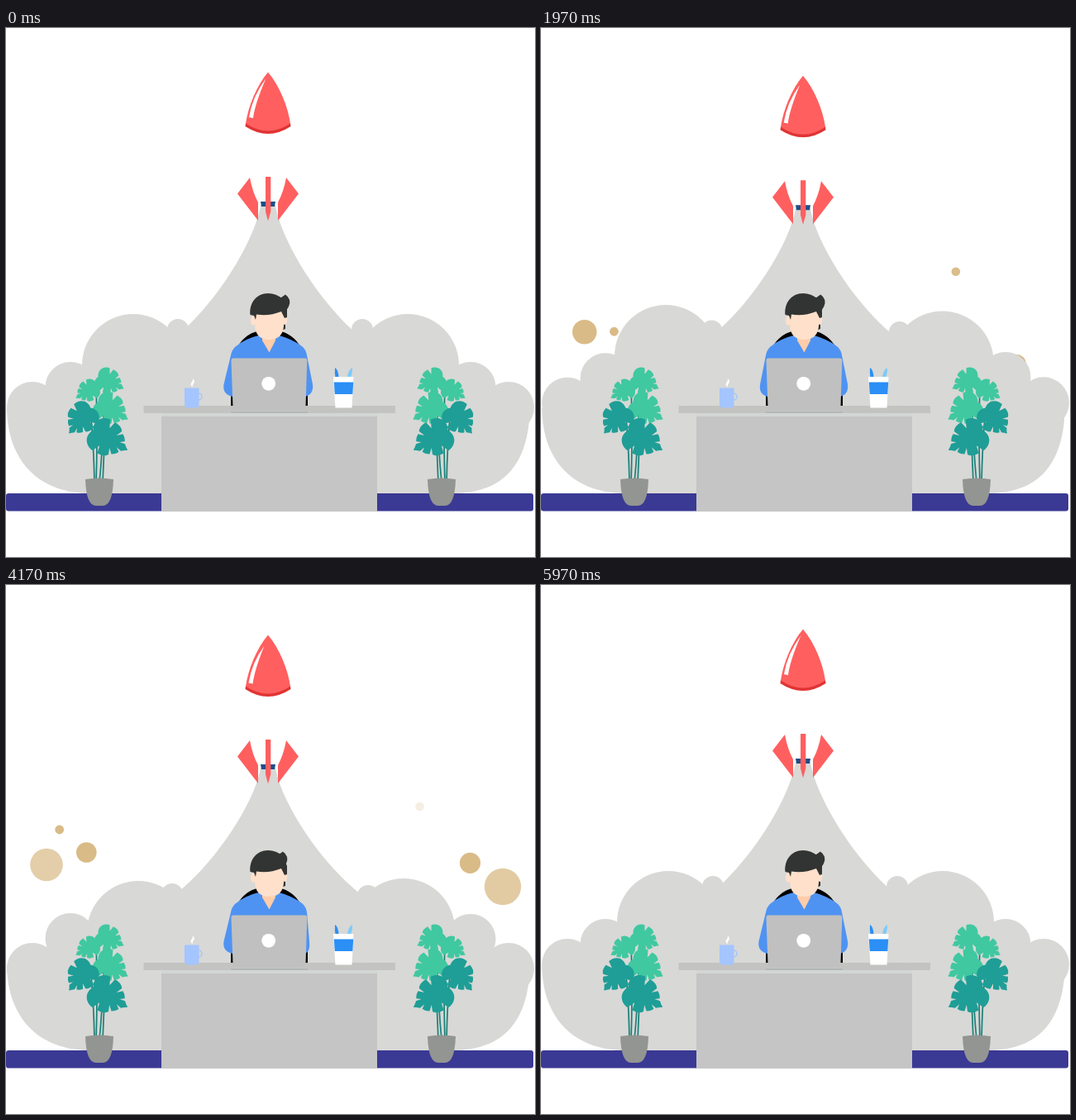
An HTML page that plays this animation: 640 px wide and 640 px high, repeating every 6.01 s.

```html
<!DOCTYPE html>
<html lang="en">
<head>
<meta charset="utf-8">
<title>Desk launch</title>
<style>
html, body { margin: 0; width: 100%; height: 100%; overflow: hidden; background: #fff; }
svg { display: block; width: 100vw; height: 100vh; }
</style>
</head>
<body>
<svg viewBox="0 0 640 640">
  <defs>
    <path id="half" d="M0 2C-16-20-2-46 24-48L34-27 39-48Q60-48 67-36L60-19 73-31Q84-25 87-16L76-8 91-11 104 0V2Z"/>
    <g id="leaf"><use href="#half"/><use href="#half" transform="scale(1 -1)"/></g>
    <g id="plant">
      <g fill="none" stroke="#1a8078" stroke-width="1.7">
        <path d="M100 432Q106 425 109 433Q111 490 109 550"/>
        <path d="M102 462Q106 500 107 550"/>
        <path d="M119 428Q118 500 113 550"/>
        <path d="M121 458Q119 500 117 550"/>
      </g>
      <g fill="#40c8a0">
        <use href="#leaf" transform="translate(109 433.5) rotate(150) scale(.27)"/>
        <use href="#leaf" transform="translate(112 422) rotate(25) scale(.32)"/>
        <use href="#leaf" transform="translate(112 453) rotate(30) scale(.39)"/>
      </g>
      <g fill="#1e9e96">
        <use href="#leaf" transform="translate(102 460) rotate(130) scale(.38)"/>
        <use href="#leaf" transform="translate(106 487) rotate(30) scale(.45)"/>
      </g>
      <path fill="#929591" d="M96 546Q113 543 130 546Q129 578 117 578H109Q97 578 96 546Z"/>
    </g>
  </defs>

  <g id="dust" fill="#d9bb87"></g>

  <g fill="#d8d8d6">
    <path id="cone" d="M308 214C302 255 255 335 200 378V400H434V378C379 335 332 255 326 214Z"/>
    <path d="M1 460C2 525 40 562 100 563H543C600 562 628 530 633 475V462L585 448 545 410H440V376H200V410H95L55 448Z"/>
    <g id="clouds"></g>
  </g>

  <g id="rocket">
    <path fill="#e03434" d="M290 115L289.5 119Q317 137 344.5 119L344 115Z"/>
    <path fill="#ff5f5f" d="M317 53.5C303 70 293 95 290 115.5Q317 133.5 344 115.5C341 95 331 70 317 53.5Z"/>
    <path id="shine" fill="#fff"/>
    <path fill="#1f4e86" d="M308 210H326L325 216H309Z"/>
    <g fill="#ff5f5f">
      <path d="M314 180H320.3V222L317 233.5 314 222Z"/>
      <path id="fin" d="M295 181L280 200.5 305 233V211Q298 198 295 181Z"/>
      <use href="#fin" transform="translate(634 0) scale(-1 1)"/>
    </g>
  </g>

  <rect y="563" width="638" height="21.5" rx="3" fill="#3a3994"/>
  <use href="#plant"/>
  <use href="#plant" transform="translate(640 0) scale(-1 1)"/>

  <path d="M278 390C286 372 301 365 318 365S349 371 359 390Z"/>
  <rect x="272" y="440" width="93" height="18"/>
  <path id="torso" fill="#4f93f2"/>
  <path fill="#ffcda9" d="M310 372H326V378L318.5 392.5 310 378Z"/>
  <path fill="#333" d="M300 357L304 366H333L338 364V355Z"/>
  <g fill="#ffe0cb">
    <ellipse cx="299" cy="354" rx="3" ry="6"/>
    <ellipse cx="337.3" cy="353" rx="3" ry="6"/>
    <path d="M301 343H336V360Q335 377 318.5 377Q302 377 301 360Z"/>
  </g>
  <g fill="#323433">
    <path d="M302 353L300 348 295.5 347C294 333 303 321 317 321Q327 321 335 328L340 340V350L337 351 333 343Q318 349 303 346.5Z"/>
    <path id="tuft" d="M328 327L333 326 338 322.5Q346 328 342 337L339 342 330 340Z"/>
  </g>

  <rect x="188" y="464" width="261" height="121" fill="#c5c5c5"/>
  <rect x="188" y="465" width="261" height="5" fill="#d2d6d5"/>
  <rect x="166.5" y="457" width="304.5" height="9" fill="#c3c3c2"/>
  <rect x="272" y="464.5" width="93" height="1" fill="#a3abae"/>
  <path fill="#c0c0c0" stroke="#c0c0c0" stroke-width="6" stroke-linejoin="round" d="M275.5 402.5H361.3L359.5 459H277.5Z"/>
  <circle cx="317.7" cy="430.3" r="8.4" fill="#fff"/>

  <circle cx="233" cy="446" r="4" fill="none" stroke="#a4c5ff" stroke-width="1.5"/>
  <path fill="#a4c5ff" d="M216 435.5H233.5V455Q233.5 459.5 229 459.5H220.5Q216 459.5 216 455Z"/>
  <path fill="#fff" d="M226 424Q229.5 428 226.5 430.5Q225 432 226 434.5Q222.5 432 224 429.5Q226.5 427 226 424Z"/>

  <path fill="#2b8ff5" d="M398 411Q402 413 402.5 423H398.5Q397.5 416 398 411Z"/>
  <path fill="#7ccbfa" d="M418.5 411Q420 414 417 423H413Q414 414 418.5 411Z"/>
  <path fill="#fff" d="M396 422H420.5L418.5 459.5H398.5Z"/>
  <path fill="#2b8ff5" d="M396.8 428.5H420.2L419.3 443H397.8Z"/>
</svg>

<script>
const LOOP = 6010;
const BEATS = [0, 1430, 2570, 3530, 4170, 5130, 5780];
const $ = id => document.getElementById(id);

// Smooth curve through the values, flat at every turning point.
function slope(ts, vs, i) {
  if (i < 1 || i > ts.length - 2) return 0;
  const rate = k => (vs[k + 1] - vs[k]) / (ts[k + 1] - ts[k]);
  const a = rate(i - 1), b = rate(i);
  return a * b > 0 ? 2 * a * b / (a + b) : 0;
}
function sample(ts, vs, t) {
  if (!Array.isArray(vs)) return vs;
  const last = ts.length - 1;
  if (t <= ts[0]) return vs[0];
  if (t >= ts[last]) return vs[last];
  let i = 0;
  while (ts[i + 1] <= t) i++;
  const span = ts[i + 1] - ts[i], u = (t - ts[i]) / span;
  return vs[i] + (vs[i + 1] - vs[i]) * u * u * (3 - 2 * u)
    + span * u * (1 - u) * ((1 - u) * slope(ts, vs, i) - u * slope(ts, vs, i + 1));
}

const dots = [];
function addDot(parent, ts, x, y, r, fade) {
  const el = document.createElementNS('http://www.w3.org/2000/svg', 'circle');
  dots.push({ el: $(parent).appendChild(el), ts, x, y, r, fade });
}
const cloud = (r, x, y, ts = BEATS) => addDot('clouds', ts, x, y, r);
const puff = (fade, ts, x, y, r) => addDot('dust', ts, x, y, r, fade);

cloud(62, [154, 148, 156, 160, 160, 156, 154], [408, 391, 408, 420, 420, 412, 408]);
cloud(62, [486, 490, 480, 479, 481, 484, 486], [408, 395, 417, 420, 417, 411, 408]);
cloud(30.5, 78, [434.5, 426.5, 422, 425.5, 427.5, 430, 434.5]);
cloud(30.5, 562, [434.5, 422, 423.5, 426.5, 428.5, 430, 434.5]);
cloud(31, 32, [459, 464, 463, 446.5, 464, 463.5, 459], [0, 630, 1430, 2450, 3530, 5130, 5780]);
cloud(31, 608, [459, 464, 448.5, 460.5, 464, 464, 459], [0, 650, 1430, 2570, 3530, 5130, 5780]);
cloud(13, [208, 208, 204, 202, 201, 204, 208], [365, 365, 369, 371, 374, 375, 365]);
cloud(13, [431, 432, 436, 437, 438, 436, 431], [365, 366, 371, 373, 376, 376, 365]);

puff([3550, 5750], [800, 1430, 2570, 4170, 5750],
  [74, 59.5, 49, 49, 49], [415, 379, 359, 338.5, 312], [10, 13, 16.3, 19.8, 22]);
puff([4300, 5600], [1430, 2570, 3530, 4170, 5600],
  [98, 74, 66.5, 64.7, 64.7], [385, 336, 306, 296, 277], 5.4);
puff([4850, 5770], [2570, 3530, 4170, 5130, 5770],
  [130, 103.5, 97.3, 101.5, 103], [385, 341, 323.5, 302, 288], 12.3);
puff([1900, 4900], [300, 1430, 2570, 4170, 4900],
  [478, 503, 500.5, 500.5, 500.5], [370, 302, 289, 268, 258], 5.3);
puff([4850, 5770], [1600, 2570, 3530, 4170, 5770],
  [535, 552, 561.5, 561.5, 561.5], [400, 362, 343, 336.3, 320], [5, 7.7, 11.4, 12.6, 12.6]);
puff([3750, 5500], [1500, 2570, 3530, 4170, 5600],
  [572, 584, 599, 601, 600], [420, 383, 375, 365, 343], [10, 15, 21.7, 22.2, 22.2]);

function drawDot({ el, ts, x, y, r, fade }, t) {
  el.setAttribute('cx', sample(ts, x, t));
  el.setAttribute('cy', sample(ts, y, t));
  el.setAttribute('r', sample(ts, r, t));
  if (!fade) return;
  const [from, to] = fade;
  const alpha = Math.min(1, Math.max(0, (to - t) / (to - from)));
  el.setAttribute('opacity', t < ts[0] ? 0 : alpha);
}

// Two dips of 2400 ms, the second one after a rest.
function dip(t) {
  const local = t < 3600 ? t : t - 3600;
  return local < 2400 ? (1 - Math.cos(local / 1200 * Math.PI)) / 2 : 0;
}

function drawRocket(t) {
  const p = dip(t), drop = 15 * p, base = 373, top = 214;
  const scale = 1 - drop / (base - top);
  $('rocket').setAttribute('transform', `translate(0 ${drop})`);
  $('cone').setAttribute('transform', `translate(0 ${base * (1 - scale)}) scale(1 ${scale})`);
  const tipX = 314.5 - 4.5 * p, tipY = 61 + 12.5 * p, endY = 109 + 7.5 * p;
  $('shine').setAttribute('d',
    `M${tipX} ${tipY}Q${298 - p} ${83 + 8 * p} ${294 - p} ${endY - 1}L${299 - p} ${endY}`
    + `Q${301 - p} ${92 + 9 * p} ${tipX} ${tipY}Z`);
}

function drawPerson(t) {
  const left = sample(BEATS, [0, 3, 0, 0, 0, 1, 0], t);
  const right = sample(BEATS, [0, 0, 0, 0, -4, -3, 0], t);
  const tuft = sample(BEATS, [0, .5, 0, 0, -3, .5, 0], t);
  $('torso').setAttribute('d',
    `M309 371Q288 376 277 386Q273 390 272 396L${263.5 + left} 431Q${261.5 + left} 443 274 446H362`
    + `Q${372.5 + right} 443 ${371 + right} 431L364 396Q363 389 358 385Q346 376 327 371L318.5 392Z`);
  $('tuft').setAttribute('transform', `translate(${tuft} 0)`);
}

const start = performance.now();
function tick() {
  const t = (performance.now() - start) % LOOP;
  dots.forEach(dot => drawDot(dot, t));
  drawRocket(t);
  drawPerson(t);
  requestAnimationFrame(tick);
}
tick();
</script>
</body>
</html>
```
